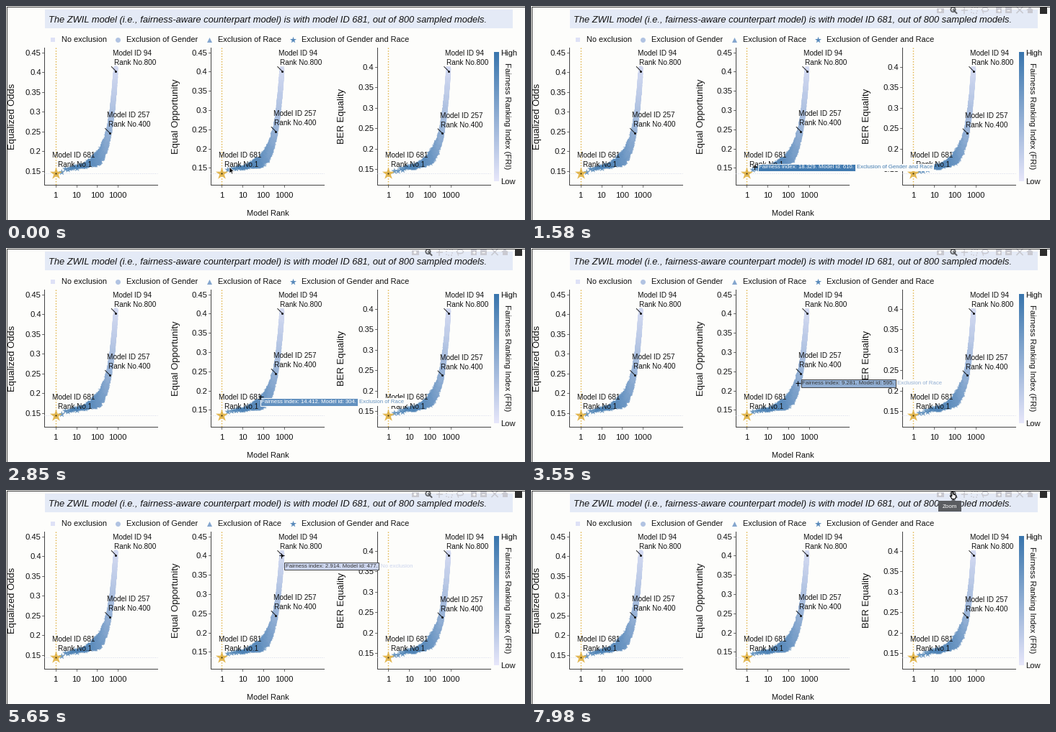
Write a matplotlib script that moves like this. It is 720 by 298 pixels and loops after 8000 ms.

```python
import numpy as np
import matplotlib.pyplot as plt
from matplotlib.animation import FuncAnimation
from matplotlib.colors import LinearSegmentedColormap
from matplotlib.patches import Circle, Ellipse, Polygon, Rectangle

W, H, DPI = 720, 298, 100
FRAMES, STEP = 160, 50
PT = 72 / DPI
BG, INK, GOLD = "#fdfdfb", "#111111", "#e0b040"
PALE, GREY, DARK = "#e4eaf6", "#c9c9d0", "#5a5c60"

plt.rcParams["font.family"] = "Liberation Sans"
fig = plt.figure(figsize=(W / DPI, H / DPI), dpi=DPI, facecolor=BG)
ax = fig.add_axes([0, 0, 1, 1])
cmap = LinearSegmentedColormap.from_list("fri", ["#e6e6fa", "#3a76ad"])
FRI_MAX = 19


def text(x, y, s, px, ha="left", color=INK, z=6, **kw):
    """Horizontal text whose capitals are centred on y."""
    return ax.text(x, y + 0.36 * px, s, fontsize=px * PT, ha=ha,
                   va="baseline", color=color, zorder=z, **kw)


def turned(x, s, px, angle):
    ax.text(x, 153.5, s, fontsize=px * PT, ha="center", va="center",
            rotation=angle, color=INK, zorder=3)


def line(xs, ys, color=INK, lw=1.0, z=2, **kw):
    return ax.plot(xs, ys, color=color, lw=lw * PT, zorder=z, **kw)[0]


def box(x, y, w, h, color, z=2, **kw):
    return ax.add_patch(Rectangle((x, y), w, h, fc=color, zorder=z,
                                  **{"ec": "none", **kw}))


def dots(x, y, px, marker, color, z=4, **kw):
    ax.scatter(x, y, s=(px * PT) ** 2, marker=marker, c=color,
               linewidths=0, zorder=z, **kw)


# Frame, banner, legend and colour bar
box(0.5, 0.5, W - 1, H - 1, "none", 30, ec="#333333", lw=PT)
box(54, 5, 649, 26, PALE)
text(59, 18.3, "The ZWIL model (i.e., fairness-aware counterpart model) is with "
     "model ID 681, out of 800 sampled models.", 12.95, style="italic")

KINDS = ["No exclusion", "Exclusion of Gender", "Exclusion of Race",
         "Exclusion of Gender and Race"]
MARKS = "so^*"
SIZES = [6.5, 7, 7, 9.5]
for k, x in enumerate((77, 167, 294, 410)):
    dots([x - 11.8], [46.5], SIZES[k], MARKS[k], [cmap(0.05 + 0.26 * k)])
    text(x, 46.5, KINDS[k], 11.05)

ax.imshow(np.linspace(1, 0, 180)[:, None], cmap=cmap, aspect="auto",
          extent=(677, 684, 244, 64), zorder=2)
text(686, 64.5, "High", 11.2)
text(686, 244, "Low", 11.2)
turned(694.5, "Fairness Ranking Index (FRI)", 11.4, 270)
text(363, 288.5, "Model Rank", 11, "center")

# Panels: metric and index as functions of rank
DECADE = 28.8
rank = np.arange(2, 801)
logs, part = np.log10(rank), rank / 800
rise = 7 * logs + 122 * part ** 1.5
spread = 1 + 4.2 * np.exp(-((logs - 2.2) / 0.55) ** 2)
fri = FRI_MAX - 1.8 * logs - 11.5 * part
tone = fri / FRI_MAX


def note(x, y, first, second, shift):
    text(x, y, first, 10)
    text(x + shift, y + 13, second, 10)


def panel(left, title, title_x, value, top, gap, mid_y, seed):
    rng = np.random.default_rng(seed)
    one, right = left + 15.5, left + 157
    line([left, left, right], [58, 249, 249], "#444444")
    y = top
    while value > 0.14:
        line([left - 3, left], [y, y], "#444444", 0.8)
        text(left - 4.5, y, f"{value:.2f}".rstrip("0"), 11.3, "right")
        value, y = value - 0.05, y + gap
    for i in range(4):
        x = one + DECADE * i
        line([x, x], [249, 252], "#444444", 0.8)
        text(x, 262.5, str(10 ** i), 11.3, "center")
    turned(title_x, title, 13, 90)
    line([one, one], [58, 249], GOLD, 1.4, 3, ls=":")
    line([left, right], [232.5, 232.5], "#d5d9ea", 1, 3, ls=":")

    ys = 232 - rise + spread * np.clip(rng.normal(-0.2, 1, rank.size), -1.7, 1.7)
    kind = np.clip(np.rint(rng.normal(3 * tone, 0.8)), 0, 3)
    kind[:14] = 3
    for k in range(4):
        on = kind == k
        dots(one + logs[on] * DECADE, ys[on], SIZES[k], MARKS[k],
             cmap(tone[on]), alpha=0.75)
    dots([one], [232.5], 18, "*", GOLD, 5, alpha=0.9)
    dots([one], [232.5], 2.2, "o", "#4a3a10", 6)

    note(left + 94.3, 65.2, "Model ID 94", "Rank No.800", 2)
    note(left + 87, mid_y - 25, "Model ID 257", "Rank No.400", 1.5)
    note(left + 11, 207.5, "Model ID 681", "Rank No.1", 8)
    for n, y in ((800, 90.5), (400, mid_y)):
        x = one + DECADE * np.log10(n)
        line([x - 6, x], [y - 6, y], INK, 0.9, 5)
        dots([x], [y], 3, "o", INK, 5)


panel(53.2, "Equalized Odds", 9.3, 0.45, 64.5, 27.5, 176.5, 3)
panel(283.7, "Equal Opportunity", 236, 0.45, 64.5, 26.8, 174.5, 8)
panel(514.7, "BER Equality", 466, 0.40, 85, 28.4, 177, 21)

# Toolbar
Z = 12


def plus(x, y, r, color, lw, upright=True):
    marker = "+" if upright else "_"
    return line([x], [y], color, 1, Z, marker=marker, ms=2 * r * PT, mew=lw * PT)


bar = [
    box(562.5, 3, 10, 6.5, GREY, Z),
    ax.add_patch(Circle((567.5, 6), 1.9, fc=BG, zorder=Z)),
    ax.add_patch(Circle((585.5, 5), 3.2, fc="none", ec=DARK, lw=1.2, zorder=Z)),
    line([587.8, 590.5], [7.3, 10], DARK, 1.9, Z),
    plus(585.5, 5, 1.7, DARK, 1),
    plus(601, 5.5, 4.5, GREY, 1.5),
    box(611, 1.5, 8, 8, "none", Z, ec=GREY, ls=":", lw=1.1),
    ax.add_patch(Ellipse((630, 5), 9, 5.5, fc="none", ec=GREY, zorder=Z)),
    line([626.5, 627.5], [7, 10], GREY, 1.3, Z),
    box(644.5, 1.5, 8.5, 8.5, GREY, Z), plus(648.7, 5.7, 2.3, BG, 1.2),
    box(658, 1.5, 8.5, 8.5, GREY, Z), plus(662.2, 5.7, 2.3, BG, 1.2, False),
    line([674, 682], [1.5, 9.5], GREY, 1.6, Z),
    line([674, 682], [9.5, 1.5], GREY, 1.6, Z),
    ax.add_patch(Polygon([(687, 5.8), (692, 1), (697, 5.8)], fc=GREY, zorder=Z)),
    box(688.5, 5.5, 7, 4.5, GREY, Z),
    box(706, 1.5, 9.5, 9.5, "#2d2d2d", Z),
]
zoom_tip = [
    box(565, 15, 32, 15, DARK, 14),
    ax.add_patch(Polygon([(583, 15), (589, 15), (586, 12)], fc=DARK, zorder=14)),
    text(581, 22.5, "Zoom", 8, "center", "white", 15),
]

# Where the pointer rests: start, end, x, y, then index, model and kind hovered
STOPS = [
    (0.0, 1.70, 311, 225, 18.329, 610, 3),
    (2.15, 2.40, 341.5, 223, 16.122, 709, 3),
    (3.40, 3.75, 371, 188.5, 9.281, 595, 2),
    (4.60, 5.00, 381, 151.5, 4.734, 394, 1),
    (5.70, 5.90, 383, 91, 2.308, 94, 0),
    (6.70, 7.20, 541, 42, 0, 0, 0),
    (7.75, 8.00, 586, 3.5, 0, 0, 0),
]
HOVER = (0.6, 5.9)


def locate(t):
    """Stop before t, stop after t and eased progress between them."""
    i = max(k for k, s in enumerate(STOPS) if s[0] <= t)
    a, b = STOPS[i], STOPS[min(i + 1, len(STOPS) - 1)]
    u = 0 if t <= a[1] else (t - a[1]) / (b[0] - a[1])
    return a, b, u * u * (3 - 2 * u)


def blend(a, b, u):
    return [p + (q - p) * u for p, q in zip(a[2:5], b[2:5])]


FONT = 7.75
style = dict(fontsize=FONT * PT, va="center")
name_text = ax.text(0, 0, "", zorder=10, **style,
                    bbox=dict(boxstyle="square,pad=0.22", fc=BG, ec="none"))
tip_text = ax.text(0, 0, "", zorder=11, **style,
                   bbox=dict(boxstyle="square,pad=0.22", lw=0.7))
tip_tail = ax.add_patch(Polygon([(0, 0), (1, 1), (1, 0)], zorder=10))
label = [name_text, tip_text, tip_tail]


def show_label(t):
    on = HOVER[0] <= t < HOVER[1]
    for part in label:
        part.set_visible(on)
    if not on:
        return
    a, b, u = locate(t)
    u = np.floor(u * 4) / 4
    x, y, value = blend(a, b, u)
    model, kind = a[5:]
    if u > 0:
        model = np.random.default_rng(int(value * 1000)).integers(100, 800)
        kind = b[6]
    color = cmap(value / FRI_MAX)
    dark = value > 12
    tip_text.set_text(f"Fairness index: {value:.3f}. Model id: {model}.")
    tip_text.set_position((x + 5.5, y))
    tip_text.set_color("white" if dark else "#333333")
    tip_text.get_bbox_patch().set(facecolor=color,
                                  edgecolor=BG if dark else "#444444")
    tip_tail.set_xy([(x, y), (x + 4, y - 3), (x + 4, y + 3)])
    tip_tail.set_facecolor(color)
    name_text.set_text(KINDS[kind])
    name_text.set_position((tip_text.get_window_extent().x1 + 3.8, y))
    name_text.set_color(color)


# Pointers
ARROW = np.array([(0, 0), (0, 9), (2, 7.2), (3.4, 10.2), (4.8, 9.5),
                  (3.5, 6.6), (6.2, 6.6)])
HAND = np.array([(-1, 0), (0.5, 0), (1, 3.5), (5, 5), (3.5, 10), (-1, 10),
                 (-3.8, 5.3), (-1.2, 6.2)])
arrow = ax.add_patch(Polygon(ARROW, fc="black", ec="white", lw=0.5, zorder=20))
hand = ax.add_patch(Polygon(HAND, fc="white", ec="black", lw=0.8, zorder=20))
cross = line([0], [0], "black", 1, 20, marker="+", ms=7 * PT, mew=PT)


def move_pointer(t):
    x, y, _ = blend(*locate(t))
    x, y = x - 1, y - 1
    over_legend = 38 < y < 55 and 60 < x < 565
    over_bar = y < 12 and x > 560
    in_plot = 58 < y < 249 and (284 < x < 441 or 515 < x < 672)
    use_hand = over_legend or over_bar
    use_cross = in_plot and t > 0.3
    hand.set_visible(use_hand)
    cross.set_visible(use_cross)
    arrow.set_visible(not use_hand and not use_cross)
    hand.set_xy(HAND + (x, y))
    arrow.set_xy(ARROW + (x, y))
    cross.set_data([x], [y])


def draw(n):
    t = n * STEP / 1000
    for part in bar:
        part.set_alpha(float(np.clip((t - 0.3) / 0.3, 0, 1)))
    for part in zoom_tip:
        part.set_visible(t >= 7.7)
    show_label(t)
    move_pointer(t)
    return bar + zoom_tip + label + [arrow, hand, cross]


ax.set_xlim(0, W)
ax.set_ylim(H, 0)
ax.axis("off")
anim = FuncAnimation(fig, draw, frames=FRAMES, interval=STEP, repeat=True,
                     repeat_delay=0, blit=False)
plt.show()
```
